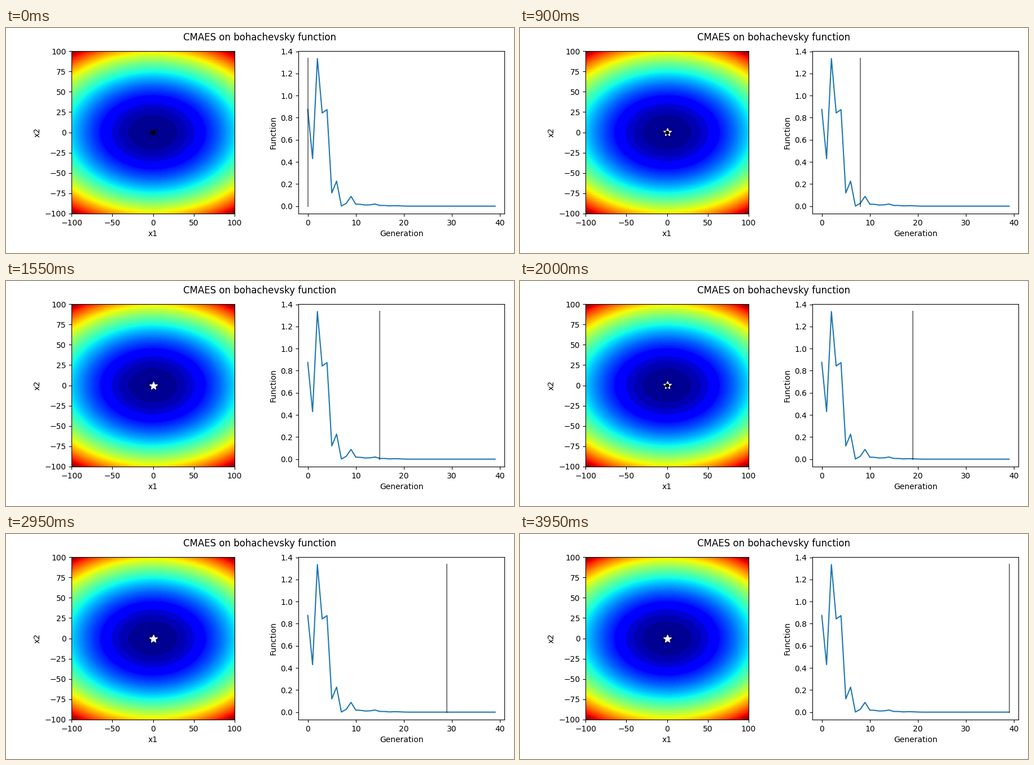
Animation of 900 by 400 pixels, one loop 4 s. Source, as a matplotlib script:

```python
import numpy as np
import matplotlib.pyplot as plt
from matplotlib.animation import FuncAnimation

W, H, DPI = 900, 400, 100
GENS, POP = 40, 8
TOP, BOTTOM = 41.2, 329.8

fig = plt.figure(figsize=(W / DPI, H / DPI), dpi=DPI)
fig.suptitle("CMAES on bohachevsky function")


def add_axes(left, right, xlabel, ylabel):
    box = [left / W, 1 - BOTTOM / H, (right - left) / W, (BOTTOM - TOP) / H]
    ax = fig.add_axes(box)
    ax.set(xlabel=xlabel, ylabel=ylabel)
    return ax


def bohachevsky(x, y):
    return (x**2 + 2 * y**2 - 0.3 * np.cos(3 * np.pi * x)
            - 0.4 * np.cos(4 * np.pi * y) + 0.7)


# Search space: wide bands near the optimum, fine ones further out
space = add_axes(116.2, 404.8, "x1", "x2")
grid = np.linspace(-100, 100, 201)
X, Y = np.meshgrid(grid, grid)
levels = np.r_[-1, 100, 930, 1760, 2590, np.linspace(4250, 30001, 87)]
space.contourf(X, Y, bohachevsky(X, Y), levels=levels, cmap="jet")
space.set(xlim=(-100, 100), ylim=(-100, 100),
          xticks=range(-100, 101, 50), yticks=range(-100, 101, 25))

# Best value of each generation
best = np.zeros(GENS)
best[:21] = [0.875, 0.43, 1.335, 0.843, 0.873, 0.12, 0.226, 0.001, 0.025,
             0.088, 0.018, 0.016, 0.010, 0.012, 0.019, 0.006, 0.006, 0.002,
             0.004, 0.003, 0.001]
history = add_axes(518.06, 883.13, "Generation", "Function")
history.plot(best)
cursor, = history.plot([0, 0], [0, best.max()], color="k", alpha=0.5)

# Population shrinking around the origin
rng = np.random.default_rng(4)
spread = 0.5 * np.exp(-np.arange(GENS) / 4)
points = rng.normal(size=(GENS, 2, POP)) * spread[:, None, None]
side = np.where(np.arange(GENS) < 28, rng.choice([-1, 1], GENS), -1)

star, = space.plot([], [], "w*", ms=10, zorder=3)
dots, = space.plot([], [], "k.", ms=6, zorder=4)


def update(i):
    gen = max(i - 1, 0) // 2
    cursor.set_xdata([gen, gen])
    if i == 0:
        star.set_data([], [])
    else:
        star.set_data([0.1 * spread[gen] + 1e-3],
                      [side[gen] * (0.1 * spread[gen] + 1e-3)])
    if i % 2 == 0:
        dots.set_data(*points[i // 2])
    else:
        dots.set_data([], [])
    return star, dots, cursor


anim = FuncAnimation(fig, update, frames=2 * GENS, init_func=lambda: update(0),
                     interval=50, repeat=True, repeat_delay=0)
plt.show()
```
